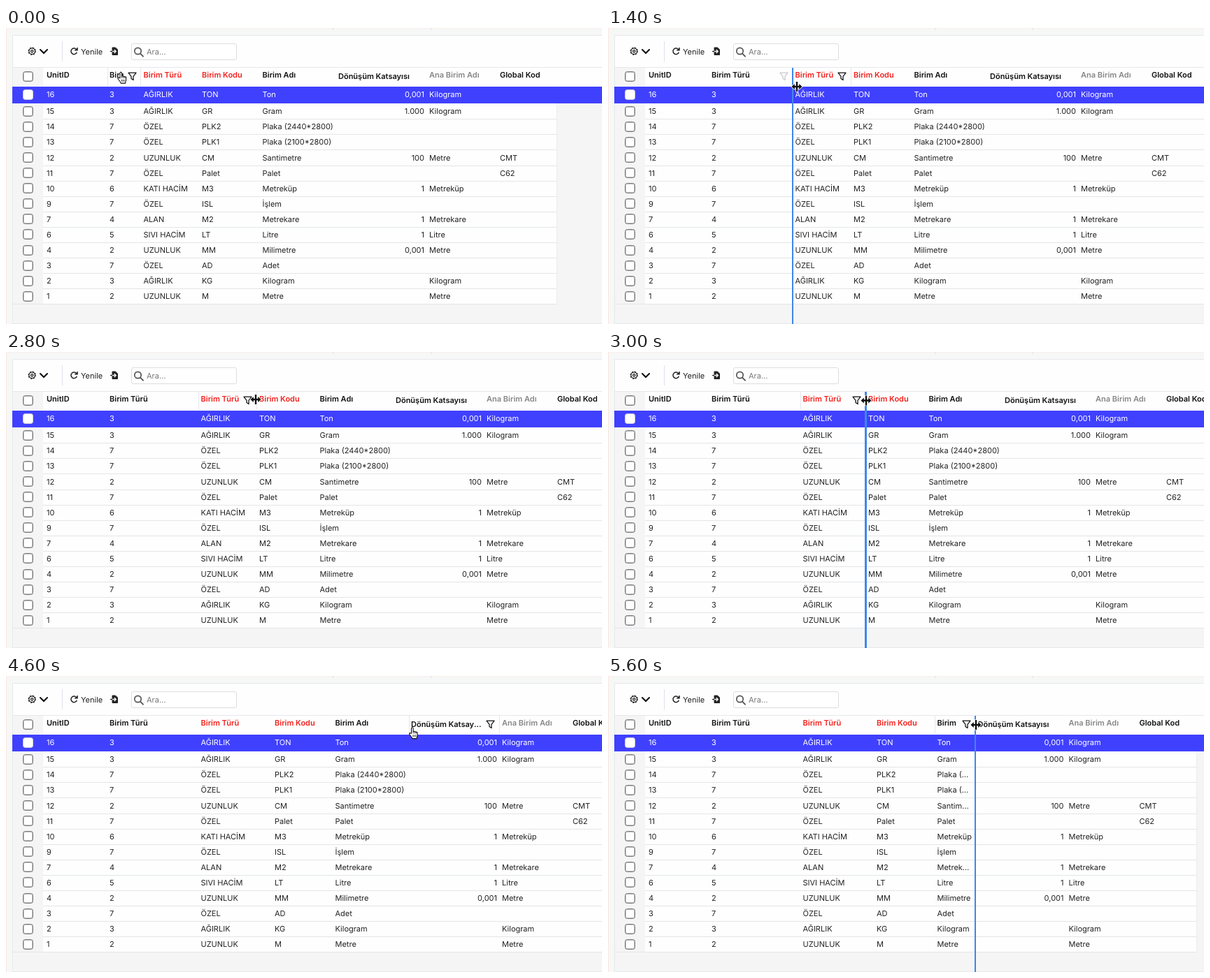
Recreate the animation shown at these times as an HTML page. Size 852x424 px, loop 5.8 s.

```html
<!DOCTYPE html>
<html lang="tr">
<head>
<meta charset="utf-8">
<title>Birim listesi</title>
<style>
html, body { margin: 0; width: 100%; height: 100%; overflow: hidden; }
#stage {
  position: relative; width: 852px; height: 424px; overflow: hidden;
  background: #f6f7f7; color: #222; font: 11px Inter, sans-serif;
  text-rendering: geometricPrecision;
}
#stage div, #stage svg { position: absolute; box-sizing: border-box; }
.edge { inset: 0; border-left: 1px solid #fbe6df; border-top: 1px solid #fbeee9; }
.panel { left: 9px; top: 10px; width: 850px; height: 414px; background: #f5f5f6; border: 1px solid #e6e8eb; }
.bar { left: 10px; top: 11px; width: 842px; height: 73px; background: #fefefe; }
.rule { left: 10px; top: 56px; width: 842px; height: 1px; background: #e6e7ea; }
.sep { top: 19px; width: 1px; height: 29px; background: #dfe1e8; }
.tool { top: 23px; line-height: 22px; }
.search { left: 179px; top: 22px; width: 151px; height: 24px; border: 1px solid #dcdde0; border-radius: 3px; background: #fff; }
#sheet { left: 10px; top: 83px; height: 313px; background: #fefefe; border-right: 1px solid #ececee; }
.checks { left: 10px; top: 57px; width: 43px; height: 338px; background: #f5f5f6; }
.line { left: 0; width: 100%; height: 1px; background: #e3e5e8; }
.picked { left: 9px; top: 84px; width: 843px; height: 24px; background: #4040ff; }
.box { left: 24px; width: 15px; height: 15px; border: 1px solid #7c7c7e; border-radius: 3.5px; background: #fff; box-shadow: inset 0 0 0 .5px #7c7c7e; }
.col { top: 56px; height: 340px; }
.cell { left: 3.5px; right: 3.5px; height: 22px; line-height: 22px; white-space: nowrap; overflow: hidden; text-overflow: ellipsis; }
.head { color: #111; font-weight: 600; text-overflow: clip; }
.num .cell { text-align: right; }
.num .head { text-align: left; text-overflow: ellipsis; }
.hover { left: 0; right: 0; top: 1px; height: 26px; border: solid #e6e7ea; border-width: 0 1px; }
.funnel { right: 6.5px; top: 6.5px; }
#guide { top: 57px; width: 2.6px; height: 367px; background: #3f87ea; }
</style>
</head>
<body>
<div id="stage">
  <div class="edge"></div>
  <div class="sep" style="left:467px;top:0;height:3px"></div>
  <div class="sep" style="left:607px;top:0;height:3px"></div>
  <div class="panel"></div>
  <div class="bar"></div>
  <div id="sheet"></div>
  <div class="checks"></div>
  <div class="rule"></div>
  <div class="picked"></div>
  <div class="sep" style="left:80px"></div>
  <div class="search"></div>
  <svg width="240" height="56" fill="none" stroke="#222" stroke-width="1.3">
    <circle cx="37.2" cy="33.2" r="4.3"/>
    <circle cx="37.2" cy="33.2" r="5" stroke-width="1.4" stroke-dasharray="1.9 2.03"/>
    <circle cx="37.2" cy="33.2" r="1.6"/>
    <path d="M49 31l5 5 5-5" stroke="#111" stroke-width="2.1" stroke-linecap="round"/>
    <path d="M101 31.2a4.3 4.3 0 1 0 .3 3.6M102 28v3.8h-3.8" stroke-width="1.5"/>
    <path d="M152 28h4.5l3 3v7.5H152z" fill="#222" stroke-width="1"/>
    <path d="M152 33.5h5M154.8 31l2.5 2.5-2.5 2.5" stroke="#fefefe" stroke-width="1.3"/>
    <path d="M149 33.5h3" stroke-width="1.3"/>
    <circle cx="188.5" cy="33" r="4.7" stroke="#555" stroke-width="1.7"/>
    <path d="M192 36.6l4 4" stroke="#555" stroke-width="2" stroke-linecap="round"/>
  </svg>
  <div class="tool" style="left:107px">Yenile</div>
  <div class="tool" style="left:201px;color:#777">Ara...</div>
  <div id="grid"></div>
  <div id="guide"></div>
  <svg id="hand" width="15" height="19">
    <path d="M4 9.4V2.3a1.3 1.3 0 0 1 2.6 0V7a1.2 1.2 0 0 1 2.2.4 1.1 1.1 0 0 1 2 .5 1 1 0 0 1 1.8.8V12c0 1.7-1 2.5-1 4.8H5.2C5 14.8 3 13.4 1.1 10.5.5 9.2 2 8.3 3 9.2z"
      fill="#fff" stroke="#111" stroke-width="1.1" stroke-linejoin="round"/>
    <path d="M6.6 7v2.6M8.8 7.6v2M10.8 8v1.8M6.4 11.5v3M8.3 11.5v3M10.2 11.5v3" stroke="#111" stroke-width=".8"/>
  </svg>
  <svg id="sizer" width="18" height="18">
    <path d="M7.8 2h2.4v5.8h2V5l4.3 4-4.3 4v-2.8h-2V16H7.8v-5.8h-2V13L1.5 9l4.3-4v2.8h2z"
      fill="#111" stroke="#fff" stroke-width="1.6" paint-order="stroke" stroke-linejoin="round"/>
  </svg>
</div>
<script>
const $ = id => document.getElementById(id);
const LOOP = 5800, STEP = 200, LEFT = 54.5;

// title, width, cell texts from top to bottom, title colour
const columns = [
  ['UnitID', 90, '16|15|14|13|12|11|10|9|7|6|4|3|2|1'],
  ['Birim Türü', 48.5, '3|3|7|7|2|7|6|7|4|5|2|7|3|2'],
  ['Birim Türü', 83.5, 'AĞIRLIK|AĞIRLIK|ÖZEL|ÖZEL|UZUNLUK|ÖZEL|KATI HACİM|ÖZEL|ALAN|SIVI HACİM|UZUNLUK|ÖZEL|AĞIRLIK|UZUNLUK', '#f3211d'],
  ['Birim Kodu', 86.5, 'TON|GR|PLK2|PLK1|CM|Palet|M3|ISL|M2|LT|MM|AD|KG|M', '#f3211d'],
  ['Birim Adı', 108.5, 'Ton|Gram|Plaka (2440*2800)|Plaka (2100*2800)|Santimetre|Palet|Metreküp|İşlem|Metrekare|Litre|Milimetre|Adet|Kilogram|Metre'],
  ['Dönüşüm Katsayısı', 130, '0,001|1.000|||100||1||1|1|0,001|||'],
  ['Ana Birim Adı', 101, 'Kilogram|Kilogram|||Metre||Metreküp||Metrekare|Litre|Metre||Kilogram|Metre', '#868688'],
  ['Global Kod', 85.5, '||||CMT|C62||||||||']
];

// Motion tables; the first number of each entry is the step
const widening = {
  1: [[5, 0], [6, 42], [7, 71], [8, 79], [9, 82]],
  2: [[14, 0], [15, 10], [16, 22]],
  4: [[25, 0], [26, -20], [27, -42], [28, -50.5]]
};
const pointer = [[0, 166.5, 70.5], [2, 178, 70], [4, 193, 71], [5, 212.5, 73], [6, 238, 78], [7, 270, 84],
  [9, 278, 82], [10, 278, 80], [12, 335, 70], [14, 357, 68], [16, 381, 71], [18, 381, 72],
  [19, 422, 81.5], [20, 445, 82], [23, 583, 81], [24, 576, 73], [25, 575, 71], [26, 556, 70], [28, 526, 70]];
const sizing = [[3, 10], [13, 18], [24, 28]];
const guiding = [[6, 9, 1], [15, 16, 2], [26, 28, 4]];
// step, column under the pointer, column with a dark funnel, column with a pale funnel
const hovering = [[0, 1, 1], [5, 2, 1], [6, 2, 1, 2], [7, 2, 2, 1], [8, 1, 1], [11, 2, 2, 1], [12, 2, 2],
  [19, 3, 2, 3], [20, 3, 3], [21, 4, 4, 3], [22, 4, 4], [23, 5, 5], [24, 4, 4, 5], [25, 4, 4]];

function add(parent, cls, css = {}, text = '') {
  const el = document.createElement('div');
  el.className = cls;
  el.textContent = text;
  Object.assign(el.style, css);
  parent.append(el);
  return el;
}

const rowMid = r => r ? 119.3 + 22.08 * (r - 1) : 95.3;
const grid = $('grid');
add(grid, 'box', { top: '62px' });
for (let r = 0; r < 14; r++) {
  add(grid, 'box', { top: Math.round(rowMid(r) - 7.5) + 'px', borderColor: r ? '' : '#c9c9dc', boxShadow: r ? '' : 'none' });
  if (r) add($('sheet'), 'line', { top: Math.round(rowMid(r) + 11 - 83) + 'px' });
}

const parts = columns.map(([title, , texts, color], i) => {
  const col = add(grid, i === 5 ? 'col num' : 'col');
  const hover = add(col, 'hover');
  const head = add(col, 'cell head', { top: i === 5 ? '2px' : 0, color: color || '' }, title);
  texts.split('|').forEach((t, r) =>
    add(col, 'cell', { top: rowMid(r) - 67 + 'px', color: r ? '' : '#fff' }, t));
  col.insertAdjacentHTML('beforeend',
    '<svg class="funnel" width="13" height="13" fill="none" stroke="#111" stroke-width="1.25" stroke-linejoin="round">' +
    '<path d="M1 1.2h11L8 6.4v5.2L5 9.6V6.4z"/></svg>');
  return { col, hover, head, funnel: col.lastChild };
});

function track(keys, s) {
  const next = keys.findIndex(k => k[0] > s);
  if (next < 0) return keys[keys.length - 1].slice(1);
  if (next === 0) return keys[0].slice(1);
  const a = keys[next - 1], b = keys[next], f = (s - a[0]) / (b[0] - a[0]);
  return a.slice(1).map((v, i) => v + (b[i + 1] - v) * f);
}

const within = (s, list) => list.find(([a, b]) => s >= a && s <= b);

function draw(s) {
  const [, over, dark, pale] = hovering.filter(h => h[0] <= s).pop();
  const guide = within(s, guiding);
  let x = LEFT;
  $('guide').style.display = guide ? '' : 'none';
  parts.forEach(({ col, hover, head, funnel }, i) => {
    const w = columns[i][1] + (widening[i] ? track(widening[i], s)[0] : 0);
    const shown = i === dark || i === pale;
    col.style.left = x + 'px';
    col.style.width = w + 'px';
    hover.style.display = i === over ? '' : 'none';
    head.style.right = shown ? '25px' : '3.5px';
    funnel.style.opacity = i === dark ? 1 : i === pale ? 0.22 : 0;
    x += w;
    if (guide && guide[2] === i) $('guide').style.left = x - 1.3 + 'px';
  });
  $('sheet').style.width = x - 10 + 'px';

  const [px, py] = track(pointer, s), wide = within(s, sizing);
  $('hand').style.display = wide ? 'none' : '';
  $('sizer').style.display = wide ? '' : 'none';
  $('hand').style.transform = `translate(${px - 7.5}px, ${py - 8.2}px)`;
  $('sizer').style.transform = `translate(${px - 9}px, ${py - 9}px)`;
}
for (const id of ['hand', 'sizer']) Object.assign($(id).style, { left: 0, top: 0 });

let start, last = -1;
function tick(now) {
  start ??= now;
  const s = Math.floor((now - start) % LOOP / STEP);
  if (s !== last) draw(last = s);
  requestAnimationFrame(tick);
}
draw(0);
requestAnimationFrame(tick);
</script>
</body>
</html>
```
